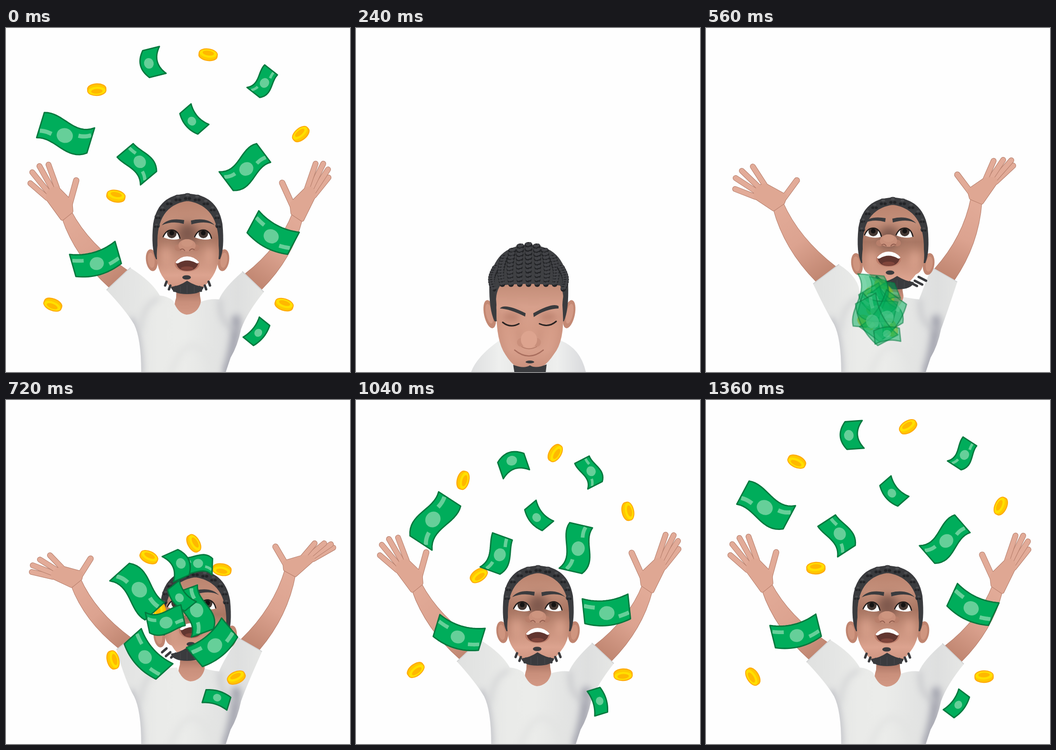
An HTML page with a canvas for the animation above (1440 ms loop, 720 px wide and 720 px high).

```html
<!DOCTYPE html>
<html lang="en">
<head>
<meta charset="utf-8">
<title>Money toss</title>
<style>
html, body { margin: 0; height: 100%; overflow: hidden; background: #fefefe }
canvas { display: block; width: 100vw; height: 100vh }
</style>
</head>
<body>
<canvas width="720" height="720"></canvas>
<script>
const ctx = document.querySelector('canvas').getContext('2d');
const LOOP = 1440, STEP = 80, THROW = 560;
const HAIR = '#3a3b3e', HAIR_DARK = '#232427', SKIN_EDGE = '#b57c69';

// Keys: time, skull x/y, face x, mouth y, goatee x
const headKeys = [
  [560, 11, 8, 3, -10, 21], [720, 16, 9, 9, -11, 0], [880, 7, 2, 4, -7, 5],
  [1040, 1, 0, 1, -1, 1], [1360, 0, 0, 0, 0, 0], [1440, 0, 0, 0, 0, 0]
];
// Keys: time, sleeve outer, sleeve inner, wrist, thumb, index, middle, ring, little finger
const leftKeys = [
  [560, 224, 535, 278, 495, 151, 372, 190, 319, 98, 290, 75, 299, 62, 314, 61, 337],
  [720, 231, 522, 266, 495, 146, 381, 177, 332, 92, 325, 71, 334, 56, 346, 54, 360],
  [880, 218, 540, 263, 504, 128, 388, 154, 324, 84, 299, 64, 304, 48, 316, 45, 337],
  [1040, 211, 547, 260, 502, 127, 391, 147, 319, 88, 288, 69, 291, 54, 303, 50, 325],
  [1440, 210, 548, 260, 502, 127, 391, 147, 319, 89, 286, 70, 289, 55, 302, 51, 325]
];
const rightKeys = [
  [560, 526, 531, 472, 501, 566, 360, 526, 307, 602, 278, 622, 276, 639, 277, 643, 288],
  [720, 536, 526, 486, 498, 595, 360, 564, 307, 646, 300, 666, 300, 680, 302, 685, 309],
  [880, 538, 541, 488, 503, 604, 378, 574, 310, 654, 285, 671, 284, 681, 292, 682, 304],
  [1040, 540, 551, 494, 509, 610, 393, 577, 320, 648, 282, 665, 283, 674, 295, 675, 312],
  [1440, 540, 552, 495, 510, 610, 394, 578, 324, 648, 284, 664, 284, 674, 296, 675, 313]
];

// Pose rows hold x, y, degrees at 720, 880, 1040 and 1360 ms; turn is the last spin.
const bills = [
  { w: 60, h: 34, bend: 6, wave: -3, mark: -1, turn: 5, pose: [402, 342, -178, 449, 217, -154, 492, 149, -117, 541, 115, -57] },
  { w: 58, h: 36, bend: 12, wave: 0, mark: 0, turn: -10, pose: [366, 342, 246, 347, 206, 207, 326, 127, 161, 299, 74, 86] },
  { w: 98, h: 49, bend: 5, wave: -6, mark: -1, turn: 4, pose: [399, 440, -110, 433, 354, -99, 465, 311, -77, 503, 295, -41] },
  { w: 57, h: 31, bend: 7, wave: 0, mark: 0, turn: 0, pose: [363, 414, 51, 370, 310, 50, 378, 246, 50, 389, 195, 49] },
  { w: 110, h: 55, bend: -6, wave: 6, mark: 1, turn: -11, pose: [279, 397, 48, 212, 298, 1, 161, 250, -57, 123, 225, -152] },
  { w: 76, h: 44, bend: 8, wave: -3, mark: -1, turn: -7, pose: [335, 466, -12, 316, 378, -39, 301, 324, -70, 280, 280, -123] },
  { w: 96, h: 52, bend: 9, wave: 0, mark: -1, turn: 3, pose: [437, 514, -40, 489, 467, -26, 525, 446, -6, 555, 436, 25] },
  { w: 99, h: 48, bend: 10, wave: 0, mark: -1, turn: -2, pose: [291, 538, 48, 243, 507, 34, 213, 496, 17, 190, 493, -14] },
  { w: 54, h: 28, bend: 5, wave: 0, mark: 0, turn: 2, pose: [442, 623, -163, 484, 625, -140, 510, 630, -107, 528, 638, -53] }
];
const coins = [
  { turn: -28, pose: [299, 329, 205, 255, 225, 75, 224, 168, -75, 190, 129, -335] },
  { turn: 40, pose: [393, 300, 240, 407, 180, 430, 417, 111, 662, 423, 56, 868] },
  { turn: 25, pose: [452, 355, 10, 519, 271, 125, 569, 233, 258, 617, 222, 475] },
  { turn: 15, pose: [322, 443, 90, 278, 397, 205, 257, 367, 325, 230, 352, 537] },
  { turn: -36, pose: [224, 544, 255, 160, 553, 115, 125, 565, -38, 98, 579, -302] },
  { turn: 20, pose: [482, 581, 155, 530, 575, 245, 559, 575, 357, 582, 579, 538] }
];

// Smooth curve through timed keys, at rest on the last one
function sample(keys, t) {
  const last = keys.length - 1;
  let i = 0;
  while (i < last - 1 && t >= keys[i + 1][0]) i++;
  const a = keys[i], b = keys[i + 1], span = b[0] - a[0];
  const s = Math.min(1, Math.max(0, (t - a[0]) / span));
  const slope = (k, j) => {
    if (k === last) return 0;
    const p = keys[Math.max(0, k - 1)], n = keys[k + 1];
    return (n[j] - p[j]) / (n[0] - p[0]) * span;
  };
  return a.map((v, j) => v + (b[j] - v) * s * s * (3 - 2 * s)
    + slope(i, j) * s * (1 - s) ** 2 - slope(i + 1, j) * s * s * (1 - s)).slice(1);
}

function flightKeys({ pose, turn }) {
  const keys = [720, 880, 1040, 1360].map((t, i) => [t, ...pose.slice(i * 3, i * 3 + 3)]);
  const [, x, y, deg] = keys[0], [, endX, endY, endDeg] = keys[3];
  return [[THROW, 363 + (x - 363) * .2, 588 + (y - 450) * .3, 2 * deg - pose[5]],
    ...keys, [LOOP, endX, endY, endDeg + turn]];
}
for (const item of [...bills, ...coins]) item.keys = flightKeys(item);

const mix = (a, b, k) => a.map((v, i) => v + (b[i] - v) * k);

function fill(d, color) {
  ctx.fillStyle = color;
  ctx.fill(new Path2D(d));
}
function stroke(d, color, width) {
  ctx.strokeStyle = color;
  ctx.lineWidth = width;
  ctx.stroke(new Path2D(d));
}
function oval(x, y, rx, ry, color, deg = 0) {
  ctx.fillStyle = color;
  ctx.beginPath();
  ctx.ellipse(x, y, rx, ry, deg * Math.PI / 180, 0, 7);
  ctx.fill();
}
function shade(x0, y0, x1, y1, ...colors) {
  const g = ctx.createLinearGradient(x0, y0, x1, y1);
  colors.forEach((c, i) => g.addColorStop(i / (colors.length - 1), c));
  return g;
}
function group(x, y, deg, draw) {
  ctx.save();
  ctx.translate(x, y);
  ctx.rotate(deg * Math.PI / 180);
  draw();
  ctx.restore();
}
function soft(clip, radius, draw) {
  ctx.save();
  ctx.clip(new Path2D(clip));
  ctx.filter = `blur(${radius}px)`;
  draw();
  ctx.restore();
}

function bill({ w, h, bend, wave, mark }) {
  const at = (u, v) => `${u * w / 2} ${v * h / 2 - bend * u * u + wave * 2.6 * (u - u ** 3)}`;
  const line = (from, to, v) => Array.from({ length: 17 }, (_, i) => at(from + (to - from) * i / 16, v)).join('L');
  const shape = `M${line(-1, 1, -1)}L${line(1, -1, 1)}Z`;
  fill(shape, '#00ad5b');
  oval(0, 0, h * .31, h * .28, '#66cf99');
  if (mark) {
    ctx.lineCap = 'butt';
    for (const side of [-1, 1]) stroke(`M${line(side * .96, side * .5, -side * mark * .45)}`, '#66cf99', h * .16);
    ctx.lineCap = 'round';
  }
  stroke(shape, '#04783e', 2.8);
}

function coin() {
  ctx.beginPath();
  ctx.roundRect(-19, -12, 38, 24, [{ x: 19, y: 10 }]);
  ctx.fillStyle = '#ffc800';
  ctx.fill();
  ctx.strokeStyle = '#ffab0a';
  ctx.lineWidth = 2.4;
  ctx.stroke();
  oval(0, 2.5, 18, 8.5, '#ffe000');
  oval(0, 3.5, 12, 5, '#ffb800');
}

function arm(p, side) {
  const points = Array.from({ length: 8 }, (_, i) => [p[i * 2], p[i * 2 + 1]]);
  const [outer, inner, wrist, thumb, ...fingers] = points;
  const mid = mix(outer, inner, .5);
  const dx = mid[0] - wrist[0], dy = mid[1] - wrist[1], len = Math.hypot(dx, dy);
  const nx = -dy / len * 12 * side, ny = dx / len * 12 * side;
  const wristIn = [wrist[0] + nx, wrist[1] + ny], wristOut = [wrist[0] - nx, wrist[1] - ny];
  const start = mix(outer, inner, .12), end = mix(outer, inner, .88);
  const bow = (a, b) => { const m = mix(a, b, .5); return [m[0] + side * 22, m[1] + 8]; };
  const limb = `M${wristOut}Q${bow(wristOut, start)} ${start}L${end}Q${bow(end, wristIn)} ${wristIn}Z`;
  const bases = fingers.map(f => mix(wrist, f, .53));
  const palm = `M${wristIn}L${mix(wrist, thumb, .38)}L${bases.join('L')}L${wristOut}Z`;
  const skin = shade(...wrist, ...mid, '#e2ab98', '#dca390', '#c18772');
  stroke(limb, SKIN_EDGE, 2);
  fill(limb, skin);
  stroke(palm, SKIN_EDGE, 9);
  const finger = (from, tip, width) => {
    stroke(`M${from}L${tip}`, SKIN_EDGE, width + 2);
    stroke(`M${from}L${tip}`, '#e2ab98', width);
  };
  [...fingers].reverse().forEach((f, i) => finger(bases[3 - i], f, 10));
  finger(mix(wrist, thumb, .3), thumb, 11);
  stroke(palm, '#dfa793', 7);
  fill(palm, '#dfa793');
}

function shirt(left, right, x, y) {
  const [lox, loy, lix, liy] = left, [rox, roy, rix, riy] = right;
  const d = `M${lox} ${loy}L${lix} ${liy}Q${lix + 45} ${liy + 28} 322 560Q338 561 ${350 + x} ${571 + y}
    Q${360 + x} ${598 + y} ${378 + x} ${600 + y}Q${402 + x} ${598 + y} ${408 + x} ${573 + y}
    Q428 566 446 568Q455 545 ${rix} ${riy}L${rox} ${roy}Q505 595 492 630Q485 665 470 690L460 720H283
    Q283 650 268 620Q250 590 ${lox} ${loy}Z`;
  fill(d, shade(210, 0, 540, 0, '#e0e1e0', '#e4e5e4', '#eaebe9', '#ebecea', '#e4e5e4', '#dedfdf', '#e6e7e5'));
  soft(d, 7, () => {
    stroke('M262 610Q280 640 282 720', '#b4b5bd', 9);
    stroke('M482 610Q482 660 462 720', '#a6a7b1', 20);
    stroke('M448 570Q446 620 480 630', '#c2c3c7', 7);
    stroke('M320 565Q285 580 282 630', '#cfd0d2', 7);
    stroke('M345 720Q390 610 440 720', '#e2e3e2', 10);
  });
  stroke(`M${lox + 1} ${loy}L${lix} ${liy}M${rix} ${riy}L${rox - 1} ${roy}`, '#d3d4d5', 2);
}

function knot(x, y, r) {
  oval(x, y, r, r * .85, HAIR);
  oval(x - r * .4, y + r * .3, r * .35, r * .3, HAIR_DARK);
  oval(x + r * .4, y + r * .3, r * .35, r * .3, HAIR_DARK);
  oval(x, y - r * .4, r * .4, r * .25, '#4c4d50');
}

function eye(x, y) {
  const d = `M${x - 17} ${y + 5}Q${x - 10} ${y - 12} ${x + 4} ${y - 10}Q${x + 15} ${y - 7} ${x + 18} ${y + 8}Q${x + 2} ${y + 13} ${x - 17} ${y + 5}Z`;
  fill(d, '#fafafa');
  ctx.save();
  ctx.clip(new Path2D(d));
  oval(x + 1, y - 3, 10, 10, '#443833');
  oval(x + 1, y - 4, 5, 5, '#151313');
  ctx.restore();
  stroke(`M${x - 17} ${y + 4}Q${x - 10} ${y - 12} ${x + 4} ${y - 10}Q${x + 15} ${y - 7} ${x + 18} ${y + 7}`, '#211c1b', 2.5);
}

function raisedHead([sx, sy, fx, my, gx]) {
  group(sx, sy, 0, () => {
    for (const side of [-1, 1]) {
      oval(380 + side * 75, 486, 12, 23, '#c08570', side * 8);
      oval(380 + side * 76, 486, 7, 16, '#cf957f', side * 8);
    }
    fill('M314 484Q303 462 308 410Q318 348 380 347Q442 348 453 410Q458 462 448 484Z', HAIR);
    const chin = my - sy;
    const face = `M317 455Q314 372 380 362Q446 372 445 455Q449 500 428 ${526 + chin}Q405 ${557 + chin} 380 ${557 + chin}Q350 ${557 + chin} 331 ${525 + chin}Q311 500 317 455Z`;
    fill(face, shade(0, 362, 0, 556, '#bb846f', '#c48f7a', '#aa7865', '#c58e79', '#dca38f', '#c88d79'));
    soft(face, 9, () => {
      oval(380 + fx - sx, 431, 20, 23, '#7f594d');
      oval(333, 478, 13, 20, '#d8a08b');
      oval(428, 478, 13, 20, '#d8a08b');
      stroke('M316 400V500M446 400V500', '#a66f5c', 5);
    });
    for (let i = 0; i < 11; i++) {
      const a = Math.PI * (1 + i / 10), c = Math.cos(a);
      knot(380 + 65 * c, 414 + 60 * Math.sin(a), 7 + 3 * (1 - c * c));
    }
  });
  group(fx, my * .4, 0, () => {
    eye(346, 433);
    eye(412, 433);
    fill('M326 413Q339 396 373 402L372 410Q348 403 326 413ZM387 403Q420 395 437 413Q420 402 388 411Z', HAIR);
  });
  group(fx, my, 0, () => {
    oval(361, 460, 8, 7, '#b87f6b');
    oval(397, 460, 8, 7, '#b87f6b');
    oval(379, 455, 18, 13, '#c88f7a');
    oval(379, 450, 12, 8, '#cd957f');
    stroke('M365 464Q370 460 374 466M384 466Q389 460 394 464', '#935f50', 2);
    oval(379, 494, 26, 16, '#bd7d6a');
    fill('M356 490Q379 472 403 490Q400 508 379 508Q358 508 356 490Z', '#623630');
    oval(379, 503, 13, 4, '#80453b');
    fill('M355 490Q365 478 379 478Q394 478 404 490Q402 494 398 492Q379 481 361 492Q356 494 355 490Z', '#fff');
    oval(378 + gx * .2, 522, 9, 4.5, HAIR);
  });
  group(gx, my, 0, () => {
    fill('M345 542Q363 540 379 529Q396 540 414 542Q410 557 379 557Q349 557 345 542Z', HAIR);
    stroke('M365 541V554M379 538V556M394 541V554', '#4b4b4e', 1);
    const sway = (gx - fx) * .7;
    for (const [x, y] of [[333, 534], [341, 542], [352, 545]])
      for (const side of [-1, 1]) {
        const px = 380 + side * (380 - x);
        stroke(`M${px - side * 3} ${y - 3}L${px + sway} ${y + 5}`, HAIR, 5);
      }
  });
}

function raisedBody(t) {
  const head = sample(headKeys, t), left = sample(leftKeys, t), right = sample(rightKeys, t);
  const neckX = head[0] * .5, neckY = head[3];
  arm(left, -1);
  arm(right, 1);
  group(neckX, neckY, 0, () =>
    fill('M358 520H404L406 560Q411 580 404 602H360Q348 588 356 565Z', shade(0, 545, 0, 602, '#a06b5a', '#c98f7b', '#d39985')));
  shirt(left, right, neckX, neckY);
  raisedHead(head);
}

function bowedBody() {
  fill('M238 730Q246 692 300 654H428Q474 672 483 730Z', shade(240, 0, 482, 0, '#dedfe0', '#eeefee', '#e4e5e4', '#eeefee', '#d8d9dc'));
  for (const side of [-1, 1]) {
    oval(363 + side * 83, 599, 12, 30, '#c48974', side * 12);
    oval(363 + side * 84, 598, 7, 21, '#d39a86', side * 12);
  }
  fill('M290 614Q278 590 279 535Q288 455 361 454Q435 455 444 535Q446 590 435 614Z', '#3f4043');
  const face = 'M294 590Q290 555 302 539Q361 532 427 539Q437 555 433 590Q437 655 414 683Q391 718 363 718Q334 718 313 684Q293 655 294 590Z';
  fill(face, shade(0, 540, 0, 718, '#c48e79', '#d7a08c', '#d59c87', '#d8a08c', '#c98f7b'));
  soft(face, 7, () => {
    oval(325, 605, 18, 10, '#bd8471');
    oval(402, 605, 18, 10, '#bd8471');
    stroke('M340 632L345 665M386 632L381 665', '#c28975', 5);
    stroke('M295 590Q294 655 316 690M433 590Q434 655 412 690', '#b97f6c', 4);
  });
  stroke('M346 459Q343 500 346 537M377 459Q381 500 377 537M328 465Q319 500 326 535M397 465Q407 500 398 535', '#a6705e', 1.6);
  for (let i = -4; i <= 4; i++) {
    const d = Math.abs(i), bottom = 536 + (d > 3 ? 10 : 0), top = 454 + d * d * 3;
    for (let k = 0; k <= 9; k++) {
      const s = k / 9, x = 361 + i * (17 + 2.4 * Math.sin(s * 2.6)), y = top + (bottom - top) * s;
      oval(x, y, 8.5 - 2.5 * s, 6, HAIR_DARK);
      oval(x - 2.5, y - 1, 4.5 - s, 3, '#424347', 30);
      oval(x + 2.5, y - 2, 4.5 - s, 3, '#424347', -30);
    }
  }
  fill('M281 545Q293 550 294 580L291 614Q281 596 281 545ZM443 545Q433 550 432 580L434 614Q444 596 443 545Z', HAIR);
  fill('M301 587Q311 575 355 597L354 604Q322 588 301 587ZM371 597Q412 574 424 582L424 587Q397 588 372 605Z', HAIR);
  stroke('M307 616Q323 629 341 619M384 619Q403 628 419 614', '#2a2322', 3);
  oval(345, 658, 8, 9, '#c98f7b');
  oval(379, 658, 8, 9, '#c98f7b');
  oval(362, 652, 17, 18, '#dda48f');
  stroke('M347 667Q362 676 378 667', '#b87e6b', 2);
  stroke('M332 674Q362 699 392 674', '#a96e5e', 2.5);
  oval(364, 699, 9, 3, HAIR);
  fill('M329 705Q352 714 364 706Q376 714 399 704L396 730H333Z', HAIR);
}

function money(t) {
  ctx.globalAlpha = t < THROW + STEP ? .5 : 1;
  const place = (item, draw) => group(...sample(item.keys, t), () => draw(item));
  coins.forEach(c => place(c, coin));
  bills.forEach(b => place(b, bill));
  ctx.globalAlpha = 1;
}

function render(now) {
  const step = Math.floor(now % LOOP / STEP) * STEP;
  const t = step || LOOP;
  ctx.fillStyle = '#fefefe';
  ctx.fillRect(0, 0, 720, 720);
  ctx.lineCap = ctx.lineJoin = 'round';
  if (t < 400) group(0, Math.abs(t - 240) / STEP * -8, 0, bowedBody);
  else group(0, Math.max(0, THROW - t) ** 2 / 160, 0, () => raisedBody(t));
  if (t >= THROW) money(t);
}

function tick() {
  render(performance.now());
  requestAnimationFrame(tick);
}
tick();
</script>
</body>
</html>
```
